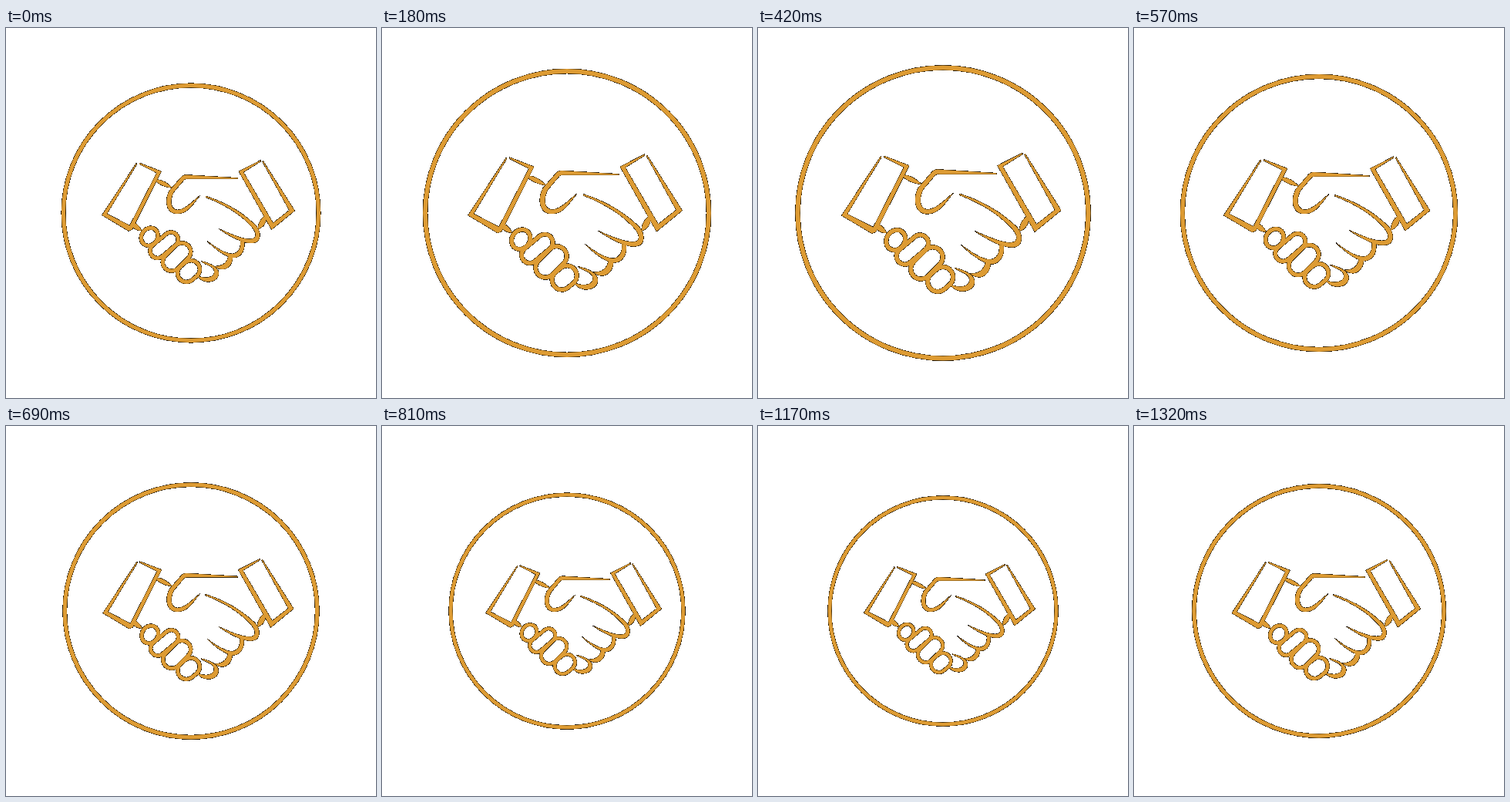
Recreate the animation shown at these times as an HTML page. Size 480 by 480 pixels, loop 1.35 s.

```html
<!DOCTYPE html>
<html lang="en">
<head>
<meta charset="utf-8">
<title>Handshake</title>
<style>
  @property --phase {
    syntax: "<angle>";
    inherits: false;
    initial-value: 0deg;
  }
  html, body {
    margin: 0;
    width: 100%;
    height: 100%;
    overflow: hidden;
    background: #fff;
  }
  svg {
    display: block;
    width: 480px;
    height: 480px;
  }
  .badge {
    fill: #dd9b33;
    transform-origin: 240px 240px;
    transform: scale(calc(1 + 0.15 * sin(var(--phase))));
    animation: pulse 1350ms steps(45) -2ms infinite;
  }
  .line {
    fill: none;
    stroke: #dd9b33;
    stroke-width: 4.8;
  }
  @keyframes pulse {
    to { --phase: 360deg; }
  }
</style>
</head>
<body>
<svg viewBox="0 0 480 480">
  <!-- Hard, dark fringe along every edge -->
  <filter id="fringe" filterUnits="userSpaceOnUse" x="0" y="0" width="480" height="480" color-interpolation-filters="sRGB">
    <feComponentTransfer in="SourceGraphic" result="matte">
      <feFuncR type="linear" slope="0"/>
      <feFuncG type="linear" slope="0"/>
      <feFuncB type="linear" slope="0"/>
      <feFuncA type="linear" slope="255" intercept="-10"/>
    </feComponentTransfer>
    <feComposite in="SourceGraphic" in2="matte" operator="atop"/>
  </filter>

  <g filter="url(#fringe)">
    <g class="badge">
      <circle class="line" cx="240" cy="240" r="165.5" style="stroke-width:5.3"/>

      <!-- Cuffs -->
      <path d="M169 175.5L124.5 242.8Q142 253 159 263.3L163.5 261.5L201.5 186L173 175V176.5L195.5 188L160.5 256.3L131 241L169.8 176.5Z"/>
      <path d="M330.5 171.5L302 186L344.5 261.5L374.5 237L333.5 172.5L332.7 173.5L367.5 236.5L346.5 253L308 187L330.5 173Z"/>

      <!-- Wrists -->
      <path d="M196 196.5Q205 197 216 207.5Q205 207 195 199.5Z"/>
      <path d="M166 252.5C170 254 174 258 176 263C171 263 167 261 164 258Z"/>
      <path d="M335 244C329 249 327 255 327 261C333 259 337 254 337.5 248Z"/>

      <!-- Thumb -->
      <path d="M301 194.6L234 190.5Q229 190.5 226 195L212 211C205 224 208 241 222 241C236 241 242 229 252 217C243 224 232 236.5 222 236C213 235 212.5 223 217.5 213L231 197Q233 195.5 236 195.8L301 195.8Z"/>

      <!-- Right hand fingers -->
      <path d="M259 218C290 228 309 242 322 254C331 262 331 273 326 277C315 284 293 272 276 260.5C295 269 312 276 321 273C326 270 324 264 318 257C305 243 288 231 259 219.5Z"/>
      <path d="M309 277C311 290 303 299 294 298C285 297 270 286 260.5 276C272 285 285 293 294 293C302 292 305 285 304 276Z"/>
      <path d="M294 295C295 306 288 313 281 313C277 313 274 312 271 309C277 309 286 308 288.5 296Z"/>
      <path d="M253 302.5C266 305 276 311 276 318C276 327 267 330 260 329C254 328 250 325 248 321C253 324 262 325 267 322C273 318 270 311 264 308.5C260 306.5 257 305.5 253 302.5Z"/>

      <!-- Left hand fingers -->
      <g class="line">
        <ellipse rx="10.4" ry="12" transform="translate(186.2 270.8) rotate(35)"/>
        <rect x="-20.9" y="-9.5" width="41.8" height="19" rx="9.5" transform="translate(205.2 281.7) rotate(-40)"/>
        <rect x="-21" y="-11.5" width="42" height="23" rx="11.5" transform="translate(221.5 297) rotate(-45)"/>
        <rect x="-15.4" y="-11.5" width="30.8" height="23" rx="11.5" transform="translate(237 315.5) rotate(-40)"/>
      </g>
    </g>
  </g>
</svg>
</body>
</html>
```
